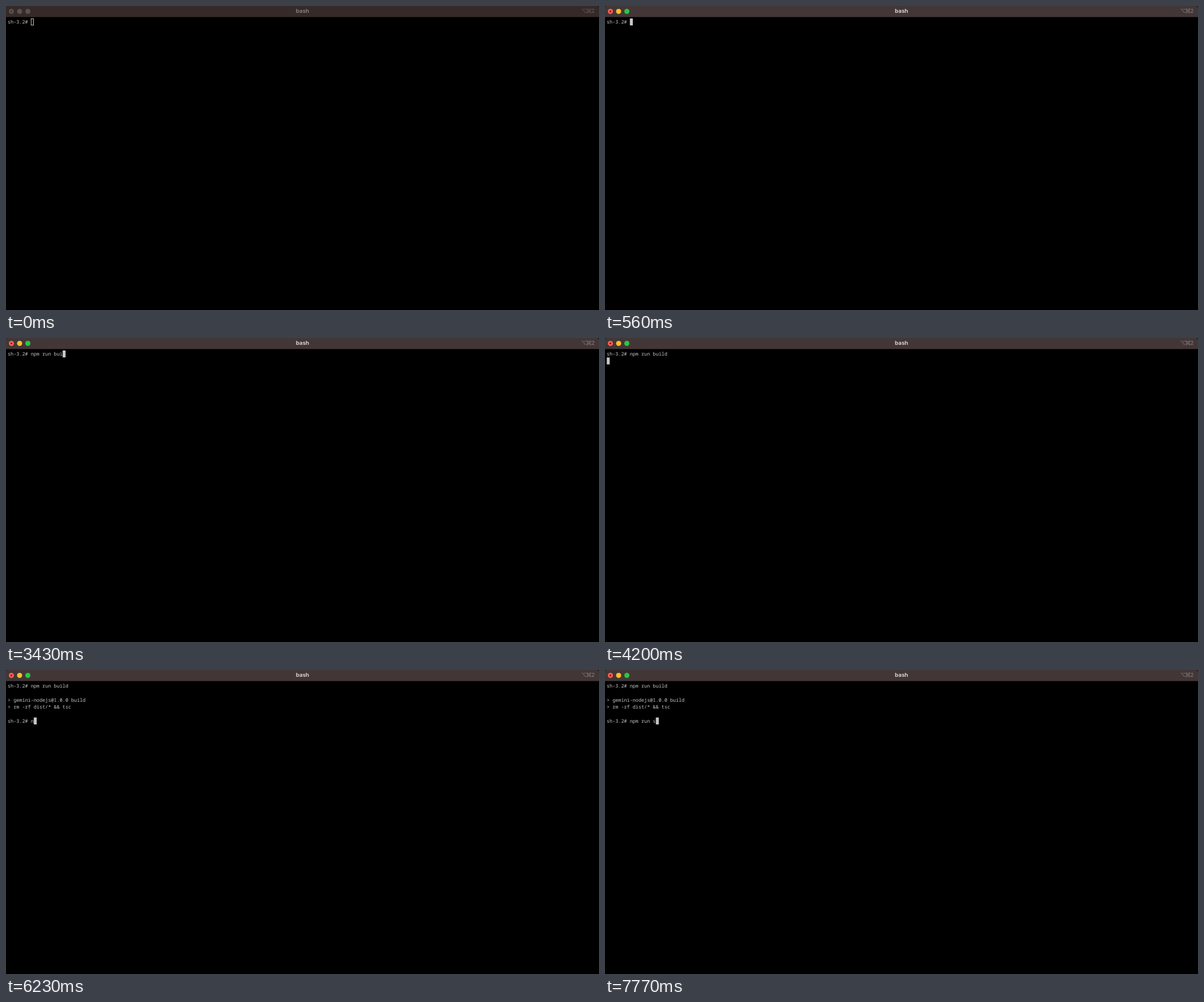
Animation of 1045x536 px, one loop 8000 ms. Source, as an HTML page:

```html
<!DOCTYPE html>
<html lang="en">
<head>
<meta charset="utf-8">
<title>Terminal</title>
<style>
  html, body { margin: 0; width: 100%; height: 100%; overflow: hidden; background: #000; }
  svg { display: block; width: 1045px; height: 536px; }
  text { text-rendering: geometricPrecision; white-space: pre; }
  .mono { font: 8.48px "Noto Sans Mono", "DejaVu Sans Mono", monospace; fill: #c7c7c7; }
  .title { font: 700 9.7px Inter, sans-serif; text-anchor: middle; }
  .key { font: 500 9.6px Inter, sans-serif; }
</style>
</head>
<body>
<svg viewBox="0 0 1045 536">
  <rect width="1045" height="536" fill="#000"/>
  <rect width="6" height="6" fill="#1d2a33"/>
  <rect x="1039" width="6" height="6" fill="#16181c"/>
  <path id="bar" d="M0 19.6V5Q0 0 5 0H1040Q1045 0 1045 5V19.6Z"/>
  <g id="lights">
    <circle cx="9.5" cy="9.5" r="4.5"/>
    <circle cx="24" cy="9.5" r="4.5"/>
    <circle cx="38.5" cy="9.5" r="4.5"/>
  </g>
  <circle id="dot" cx="9.5" cy="9.5" r="1.5"/>
  <text id="title" class="title" x="522.5" y="12.3"></text>
  <g id="keys">
    <path d="M1014.5 5.7h2.4l2.8 5.4h2.3M1018.9 5.7h3.1" fill="none"/>
    <path d="M1025.6 7h3v3h-3zM1025.6 7h-1.2a1.2 1.2 0 1 1 1.2-1.2zM1028.6 7v-1.2a1.2 1.2 0 1 1 1.2 1.2zM1028.6 10h1.2a1.2 1.2 0 1 1-1.2 1.2zM1025.6 10v1.2a1.2 1.2 0 1 1-1.2-1.2z" fill="none"/>
    <text class="key" x="1031.6" y="11.9" stroke="none">2</text>
  </g>
  <g id="lines"></g>
  <rect id="cursor"/>
  <path id="beam" d="M454.5 148q2.5 0 2.5 1.5q0-1.5 2.5-1.5M457 149.5v9.5M454.5 160.5q2.5 0 2.5-1.5q0 1.5 2.5 1.5" fill="none" stroke="#b8b8b8" stroke-width="0.9"/>
</svg>
<script>
const LOOP = 8000, CELL = 5.088, ROW = 12.35, LEFT = 3;
const PROMPT = "sh-3.2# ";
const FOCUS = 560, ENTER = 4200, OUTPUT = 4550, READY = 5250;

const first = {
  text: "npm run build",
  keys: [1470, 1820, 2030, 2100, 2310, 2520, 2520, 2660, 2940, 3290, 3430, 3850, 4130]
};
const second = {
  text: "npm run s",
  keys: [6230, 6580, 6790, 6930, 7140, 7350, 7420, 7490, 7770]
};
const titles = [[0, "bash"], [4620, "npm"], [5180, "node"], [5950, "bash"]];

const active = {
  bar: "#423736", title: "#d6d0cf", keys: "#817877",
  lights: ["#ff5f57", "#febc2e", "#28c840"], dot: "#7d0c08"
};
const idle = {
  bar: "#352a28", title: "#857b79", keys: "#625755",
  lights: ["#5b504e", "#5b504e", "#5b504e"], dot: "#3b302e"
};

const el = id => document.getElementById(id);
const set = (node, attrs) => {
  for (const name in attrs) node.setAttribute(name, attrs[name]);
};

const rows = Array.from({ length: 6 }, (_, i) => {
  const row = document.createElementNS("http://www.w3.org/2000/svg", "text");
  set(row, { class: "mono", x: LEFT, y: 31.1 + i * ROW });
  return el("lines").appendChild(row);
});

const typed = (entry, t) => entry.text.slice(0, entry.keys.filter(k => k <= t).length);

function screen(t) {
  const lines = [PROMPT + typed(first, t)];
  if (t >= OUTPUT) lines.push("", "> gemini-nodejs@1.0.0 build", "> rm -rf dist/* && tsc", "");
  if (t >= ENTER) lines.push(t >= READY ? PROMPT + typed(second, t) : "");
  return lines;
}

function drawWindow(t) {
  const look = t >= FOCUS ? active : idle;
  set(el("bar"), { fill: look.bar });
  set(el("dot"), { fill: look.dot });
  set(el("title"), { fill: look.title });
  set(el("keys"), { fill: look.keys, stroke: look.keys, "stroke-width": 0.9 });
  look.lights.forEach((fill, i) => set(el("lights").children[i], { fill }));
  el("title").textContent = titles.filter(([at]) => at <= t).pop()[1];
}

function drawCursor(t, lines) {
  const row = lines.length - 1;
  const x = LEFT + 0.1 + lines[row].length * CELL, y = 22 + row * ROW;
  const solid = t >= FOCUS;
  const inset = solid ? 0 : 0.5;
  set(el("cursor"), {
    x: x + inset, y: y + inset,
    width: 5.2 - 2 * inset, height: 12.2 - 2 * inset,
    fill: solid ? "#c7c7c7" : "none",
    stroke: solid ? "none" : "#c7c7c7"
  });
}

function draw(t) {
  const lines = screen(t);
  rows.forEach((row, i) => { row.textContent = lines[i] || ""; });
  drawWindow(t);
  drawCursor(t, lines);
  // The pointer hides as soon as typing begins.
  set(el("beam"), { visibility: t >= 1120 && t < first.keys[0] ? "visible" : "hidden" });
}

const start = performance.now();
function tick() {
  draw((performance.now() - start) % LOOP);
  requestAnimationFrame(tick);
}
tick();
</script>
</body>
</html>
```
